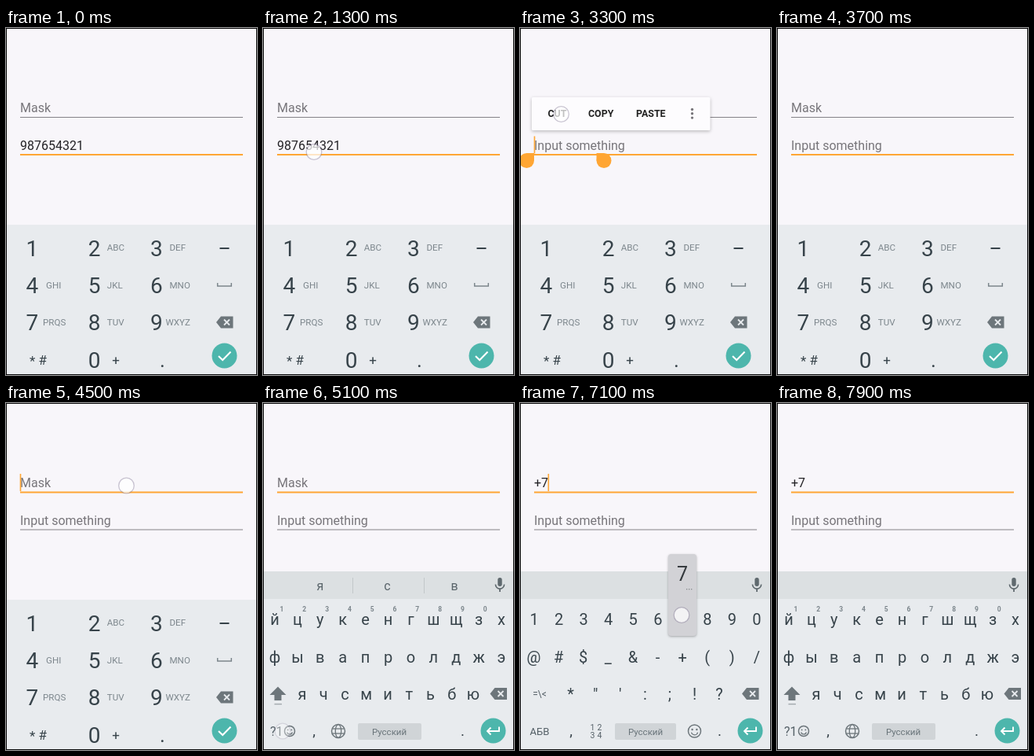
An HTML page with a canvas for the animation above (8000 ms loop, 320x441 px).

```html
<!DOCTYPE html>
<html lang="en">
<head>
<meta charset="utf-8">
<style>
html, body { margin: 0; width: 100%; height: 100%; overflow: hidden; background: #f8f6fa; }
canvas { display: block; width: 320px; height: 441px; }
</style>
</head>
<body>
<canvas id="stage"></canvas>
<script>
const W = 320, H = 441, LOOP = 8000;
const PAGE = '#f8f6fa', KEYS = '#e8ebee', BAR = '#dce0e2', INK = '#37434a';
const SOFT = '#7c868c', ICON = '#6d767b', ORANGE = '#ffa634', TEAL = '#4db6ac', HINT = '#77757a';

const canvas = document.getElementById('stage');
const ctx = canvas.getContext('2d');
const dpr = window.devicePixelRatio || 1;
canvas.width = W * dpr;
canvas.height = H * dpr;

function text(str, x, y, size, color, align = 'left', weight = 400) {
  ctx.font = `${weight} ${size}px Roboto, sans-serif`;
  ctx.textAlign = align;
  ctx.fillStyle = color;
  ctx.fillText(str, x, y);
}

function rect(x, y, w, h, color) {
  ctx.fillStyle = color;
  ctx.fillRect(x, y, w, h);
}

function round(x, y, w, h, r, color) {
  ctx.beginPath();
  ctx.roundRect(x, y, w, h, r);
  ctx.fillStyle = color;
  ctx.fill();
}

function disc(x, y, r, color) {
  ctx.beginPath();
  ctx.arc(x, y, r, 0, Math.PI * 2);
  ctx.fillStyle = color;
  ctx.fill();
}

function path(points, closed) {
  ctx.beginPath();
  points.forEach(([x, y], i) => i ? ctx.lineTo(x, y) : ctx.moveTo(x, y));
  if (closed) ctx.closePath();
}

function line(points, color, width) {
  path(points);
  ctx.strokeStyle = color;
  ctx.lineWidth = width;
  ctx.stroke();
}

function shape(points, color) {
  path(points, true);
  ctx.fillStyle = color;
  ctx.fill();
}

function oval(x, y, rx, ry, color, width, from = 0, to = Math.PI * 2) {
  ctx.beginPath();
  ctx.ellipse(x, y, rx, ry, 0, from, to);
  ctx.strokeStyle = color;
  ctx.lineWidth = width;
  ctx.stroke();
}

function fade(alpha, draw) {
  if (alpha <= 0) return;
  ctx.save();
  ctx.globalAlpha = alpha;
  draw();
  ctx.restore();
}

function shadow(color, blur, dy) {
  ctx.shadowColor = color;
  ctx.shadowBlur = blur * dpr;
  ctx.shadowOffsetY = dy * dpr;
}

// 0..1 envelope with ramps at both ends
function span(t, from, to, up = 200, down = 200) {
  const a = up ? (t - from + 100) / up : (t >= from ? 1 : 0);
  const b = down ? (to - t) / down : (t < to ? 1 : 0);
  return Math.max(0, Math.min(1, a, b));
}

const within = (t, ranges) => ranges.some(([a, b]) => t >= a && t < b);

function backspace(x, y) {
  shape([[x - 11, y], [x - 5, y - 7.5], [x + 10.5, y - 7.5], [x + 10.5, y + 7.5], [x - 5, y + 7.5]], ICON);
  line([[x - 1, y - 3.5], [x + 6, y + 3.5]], KEYS, 1.8);
  line([[x + 6, y - 3.5], [x - 1, y + 3.5]], KEYS, 1.8);
}

function smiley(x, y, r) {
  oval(x, y, r, r, ICON, 1.5);
  disc(x - r * 0.36, y - r * 0.25, r * 0.15, ICON);
  disc(x + r * 0.36, y - r * 0.25, r * 0.15, ICON);
  oval(x, y + r * 0.1, r * 0.52, r * 0.5, ICON, 1.3, 0.2, Math.PI - 0.2);
}

function globe(x, y) {
  oval(x, y, 8.5, 8.5, ICON, 1.5);
  oval(x, y, 3.7, 8.5, ICON, 1.3);
  line([[x - 7.8, y - 3], [x + 7.8, y - 3]], ICON, 1.3);
  line([[x - 7.8, y + 3], [x + 7.8, y + 3]], ICON, 1.3);
}

function mic(x, y) {
  round(x - 2.7, y - 9, 5.4, 11, 2.7, '#5f696e');
  oval(x, y - 0.5, 5.6, 5.6, '#5f696e', 1.6, 0, Math.PI);
  line([[x, y + 5], [x, y + 9]], '#5f696e', 1.8);
}

function enter(x, y) {
  disc(x, y, 16, TEAL);
  line([[x + 7.5, y - 5], [x + 7.5, y + 0.5], [x - 7, y + 0.5]], '#fff', 1.9);
  line([[x - 3, y - 4], [x - 7.5, y + 0.5], [x - 3, y + 5]], '#fff', 1.9);
}

function numberPad() {
  rect(0, 250, W, H - 250, KEYS);
  const cols = [25.5, 104.8, 184], hints = ['', 'ABC', 'DEF', 'GHI', 'JKL', 'MNO', 'PRQS', 'TUV', 'WXYZ'];
  hints.forEach((hint, i) => {
    const x = cols[i % 3], y = 290 + Math.floor(i / 3) * 47.2;
    text(i + 1, x, y, 28, INK);
    const gap = [25.5, 24, 24.5][i % 3];
    text(hint, x + (i === 6 ? 21.5 : i === 8 ? 19.5 : gap), y - 6.7, 11.6, SOFT);
  });
  text('0', 104.8, 432, 28, INK);
  text('*', 30, 429, 17, INK);
  text('#', 41.5, 428, 17, INK);
  text('+', 140, 428, 17, INK, 'center');
  text('.', 199.5, 431, 26, INK, 'center');
  rect(272.5, 279, 12, 2, INK);
  line([[269.7, 324], [269.7, 328], [287.3, 328], [287.3, 324]], SOFT, 1.5);
  backspace(279, 374);
  disc(278.5, 416.5, 16, TEAL);
  line([[271, 417], [276.2, 422], [286.5, 411.5]], '#fff', 2.1);
}

function keyRow(str, x, step, y, size = 20) {
  [...str].forEach((c, i) => text(c, x + i * step, y, size, INK, 'center'));
}

function keyboard(letters, suggest) {
  rect(0, 214, W, 35, BAR);
  rect(0, 249, W, H - 249, KEYS);
  mic(302, 231);
  if (suggest) {
    [...'ясв'].forEach((c, i) => text(c, 73 + i * 85.5, 238, 16, '#59646a', 'center'));
    rect(114, 222, 1, 20, '#c2c7ca');
    rect(205, 222, 1, 20, '#c2c7ca');
  }
  text(',', 65, 423, 19, INK, 'center');
  text('.', 254.5, 423, 19, INK, 'center');
  round(121, 407, letters ? 81 : 78, 21, 2, '#d0d4d7');
  text('Русский', letters ? 161 : 160, 421.5, 11.5, '#69747a', 'center');
  enter(293.5, 416.5);
  if (letters) {
    keyRow('йцукенгшщзх', 15, 28.9, 282, 20);
    [...'1234567890'].forEach((c, i) => text(c, 24 + i * 28.8, 265, 8.5, SOFT, 'center', 600));
    keyRow('фывапролджэ', 15, 28.9, 330, 20);
    keyRow('ячсмитьбю', 50, 27.25, 377, 20);
    shape([[8.5, 371], [19, 360.5], [29.5, 371], [23.5, 371], [23.5, 378], [14.5, 378], [14.5, 371]], ICON);
    rect(14.5, 382, 9.5, 1.4, '#a3aaae');
    backspace(300.5, 369.5);
    text('?1', 9, 423, 16, '#566168');
    smiley(34, 417, 6.5);
    globe(96, 417);
  } else {
    keyRow('1234567890', 18, 31.55, 282);
    keyRow('@#$_&-+()/', 17.5, 31.6, 330);
    keyRow('*"\':;!?', 64.5, 31.6, 377);
    text('=\\<', 25, 374, 12, '#566168', 'center');
    backspace(294, 369.5);
    text('АБВ', 25, 422, 13.2, '#566168', 'center');
    ['12', '34'].forEach((pair, row) => [...pair].forEach((c, i) =>
      text(c, 92.5 + i * 9, 416 + row * 10, 10.5, '#566168', 'center')));
    smiley(222.5, 417, 8);
  }
}

function field(y, value, hint, active) {
  text(value || hint, 18, y, 16, value ? '#232226' : HINT);
  if (active) rect(18, y + 5.5, 284, 2, ORANGE);
  else rect(18, y + 6, 284, 1, '#858388');
}

function caret(x, y) {
  rect(x, y - 17, 1.6, 22, ORANGE);
}

// square corner points up and inwards
function handle(tip, side) {
  disc(tip + side * 9.5, 168.5, 9.5, ORANGE);
  rect(side < 0 ? tip - 9.5 : tip, 159, 9.5, 9.5, ORANGE);
}

function menu() {
  ctx.save();
  shadow('rgba(0,0,0,.25)', 4, 1.5);
  round(15, 88, 227.5, 42, 1.5, '#fdfcfe');
  ctx.restore();
  text('CUT', 35.5, 113, 12.4, '#222', 'left', 600);
  text('COPY', 87, 113, 12.4, '#222', 'left', 600);
  text('PASTE', 148, 113, 12.4, '#222', 'left', 600);
  for (let i = 0; i < 3; i++) disc(219.5, 103.5 + i * 5.3, 1.7, '#77757a');
}

function keyPopup(char, top) {
  ctx.save();
  shadow('rgba(0,0,0,.3)', 3, 1);
  round(189, top, 36, 104, 4, '#d2d2d6');
  ctx.restore();
  text(char, 207, top + 33.5, 25, '#33383c', 'center');
  for (let i = 0; i < 3; i++) rect(212 + i * 3, top + 44, 1.3, 1.3, '#85888b');
}

function touch(x, y) {
  disc(x, y, 9.5, 'rgba(255,255,255,.72)');
  oval(x, y, 9.8, 9.8, 'rgba(125,115,145,.4)', 1.3);
}

// x, y, from, to
const touches = [
  [65, 157.5, 900, 2000], [52.5, 109.5, 3000, 3600], [153.5, 105, 4300, 4800],
  [25, 417, 5100, 5600], [206.5, 318, 6200, 6800], [206, 269.5, 6900, 7400], [25, 417, 7500, 7900]
];

const inputBlink = [[100, 500], [900, 1300], [3300, 3700], [4000, 4300]];
const maskBlink = [[4400, 4800], [5200, 5600], [6100, 6400], [6600, 7500]];

function draw(now) {
  const t = Math.floor((now % LOOP) / 100) * 100;
  const onMask = t >= 4400;
  const number = t < 3300 ? '987654321' : '';
  const mask = t < 6600 ? '' : t < 7000 ? '+' : '+7';

  ctx.setTransform(dpr, 0, 0, dpr, 0, 0);
  rect(0, 0, W, H, PAGE);

  fade(t < 3300 ? span(t, 1400, 3400, 200, 0) : 0, () => rect(18, 137, 80.5, 22, '#ffdfb5'));
  field(107, mask, 'Mask', onMask);
  field(154.5, number, 'Input something', !onMask);
  if (within(t, inputBlink)) caret(number ? 98 : 17.7, 154.5);
  if (within(t, maskBlink)) caret([17.7, 27, 35.5][mask.length], 107);

  fade(span(t, 1900, 3500), () => { handle(18, -1); handle(97.5, 1); });
  fade(span(t, 2500, 3600), menu);

  if (t < 4700) numberPad();
  else keyboard(t < 5400 || t >= 7700, t < 6600);

  fade(span(t, 6200, 6800, 0), () => keyPopup('+', 240));
  fade(span(t, 7000, 7400, 0), () => keyPopup('7', 192));
  for (const [x, y, from, to] of touches) fade(span(t, from, to), () => touch(x, y));

  ctx.strokeStyle = '#0b0b0c';
  ctx.lineWidth = 1;
  ctx.strokeRect(0.5, 0.5, W - 1, H - 1);
}

const start = performance.now();
function tick() {
  draw(performance.now() - start);
  requestAnimationFrame(tick);
}
tick();
</script>
</body>
</html>
```
